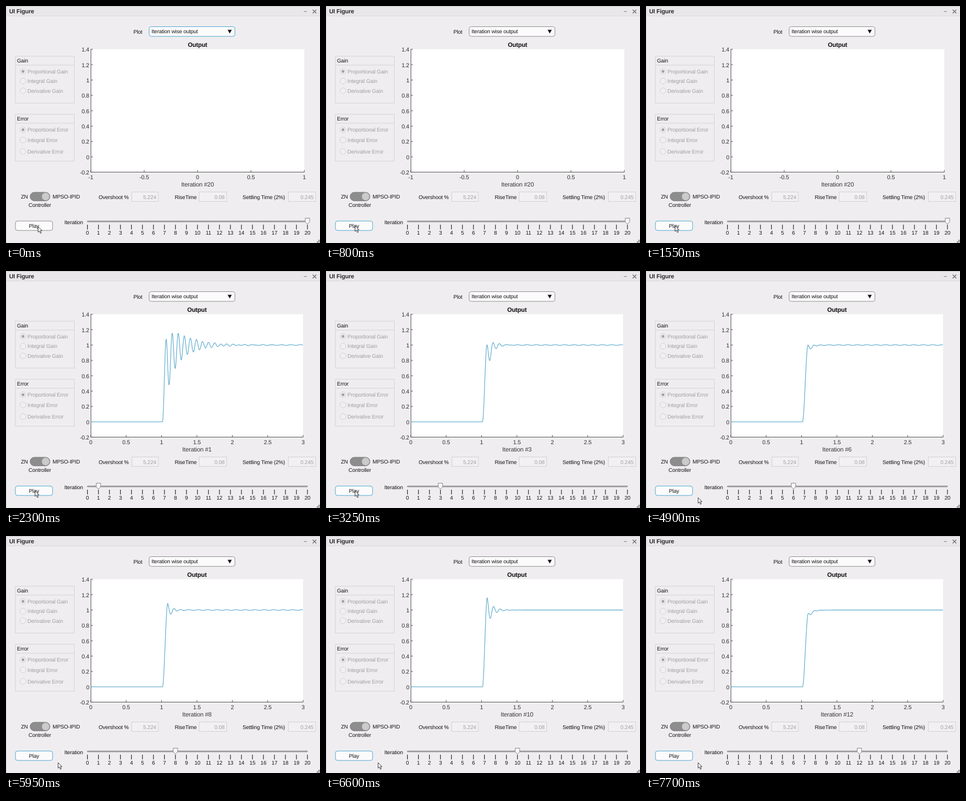
Recreate the animation shown at these times as an HTML page. Size 600 px wide and 453 px high, loop 8 s.

```html
<!DOCTYPE html>
<html lang="en">
<head>
<meta charset="utf-8">
<title>UI Figure</title>
<style>
html, body { margin: 0; width: 100%; height: 100%; overflow: hidden; background: #efedef; }
svg { display: block; width: 100vw; height: 100vh; font-family: "Liberation Sans", Arial, sans-serif; }
text { text-rendering: geometricPrecision; letter-spacing: -0.017em; }
#button, #drop { fill: #fcfbfc; stroke: #8b8b8b; }
.focus { stroke: #4aa5d2 !important; }
</style>
</head>
<body>
<svg id="stage" viewBox="0 0 600 453"></svg>
<script>
const LOOP = 8000;
const stage = document.getElementById('stage');

function add(tag, attrs, parent = stage) {
  const el = document.createElementNS('http://www.w3.org/2000/svg', tag);
  for (const key in attrs) el.setAttribute(key, attrs[key]);
  parent.appendChild(el);
  return el;
}
const rect = (x, y, width, height, fill, more = {}) =>
  add('rect', { x, y, width, height, fill, ...more });
const line = (d, stroke, parent, width = 1) =>
  add('path', { d, stroke, fill: 'none', 'stroke-width': width }, parent);

// Text is placed by the vertical centre of its capitals.
function text(str, x, cy, { size = 10.3, anchor = 'start', fill = '#161616', weight = 400, parent } = {}) {
  const el = add('text', { x, y: cy + size * 0.36, 'font-size': size, 'text-anchor': anchor, fill, 'font-weight': weight }, parent);
  el.textContent = str;
  return el;
}

// Window frame
rect(0, 0, 600, 453, '#efedef');
rect(0, 0, 600, 19, '#e9e7e9');
line('M0 .5H600', '#c4c4c4');
line('M0 19H600', '#d9d7d9');
line('M.5 0V453', '#d2d2d2');
text('UI Figure', 6, 9.5, { size: 11.4, weight: 700, fill: '#2b2b2b' });
line('M569 10.5H575', '#8c8c8c', stage, 1.2);
line('M586 7L593 14M593 7L586 14', '#777', stage, 1.7);
for (const [x, y] of [[597, 447], [594, 450], [597, 450]]) rect(x, y, 2, 2, '#555');

// Drop-down
text('Plot', 243.5, 49);
const drop = rect(273.5, 39.5, 164, 18.5, '#fcfbfc', { id: 'drop', rx: 4 });
text('Iteration wise output', 278, 48.7);
add('path', { d: 'M423.5 45.5H431.5L427.5 52.5Z', fill: '#111' });

// Radio groups
function radioGroup(title, top, height, rows, labels) {
  rect(18, top, 112.5, height, 'none', { stroke: '#d3d1d3' });
  line(`M18 ${top + 17}H130.5`, '#d3d1d3');
  text(title, 21, top + 8.6);
  labels.forEach((label, i) => {
    add('circle', { cx: 32.5, cy: rows[i], r: 5.5, fill: '#f1eff1', stroke: '#d0ced0' });
    if (!i) add('circle', { cx: 32.5, cy: rows[i], r: 2.7, fill: '#a5a5a5' });
    text(label, 41, rows[i], { fill: '#a2a2a2' });
  });
}
radioGroup('Gain', 96, 89.5, [125, 143.5, 162], ['Proportional Gain', 'Integral Gain', 'Derivative Gain']);
radioGroup('Error', 207, 89.5, [236.5, 256, 278], ['Proportional Error', 'Integral Error', 'Derivative Error']);

// Axes
const yOf = v => 288.3 - 146.8 * v;
function axes(right, ticks) {
  const g = add('g', {});
  add('rect', { x: 162, y: 82.5, width: right - 162, height: 235, fill: '#fff' }, g);
  let d = `M162.3 82.5V317.5H${right}`;
  for (let i = 0; i < 9; i++) {
    const v = (i - 1) / 5, y = yOf(v);
    d += `M162 ${y}h4`;
    text(String(v), 159, y + 0.6, { size: 10.9, anchor: 'end', fill: '#303030', parent: g });
  }
  ticks.forEach((label, i) => {
    const x = 162 + (right - 162) * i / (ticks.length - 1);
    d += `M${x} 317.5v-4`;
    text(label, x, 327.5, { size: 10.9, anchor: 'middle', fill: '#303030', parent: g });
  });
  line(d, '#4a4a4a', g);
  const mid = (162 + right) / 2;
  text('Output', mid, 74, { size: 11.7, anchor: 'middle', weight: 700, fill: '#111', parent: g });
  const caption = text('Iteration #20', mid, 341, { size: 11.7, anchor: 'middle', fill: '#3c3c3c', parent: g });
  return { g, caption };
}
const emptyAxes = axes(570, ['-1', '-0.5', '0', '0.5', '1']);
const plotAxes = axes(567.7, ['0', '0.5', '1', '1.5', '2', '2.5', '3']);
const curve = line('', '#67b0d0', plotAxes.g, 1.3);
curve.setAttribute('stroke-linejoin', 'round');

// Response: [first peak x, offset, offset decay, swing, swing decay, period]
const responses = [
  [306, -.31, 12, .385, 34, 11.6],
  [306, -.15, 12, .41, 20, 11.8],
  [307.5, -.21, 6, .21, 10, 12],
  [308, -.13, 7, .13, 9, 12],
  [309, -.08, 8, .08, 8, 12],
  [309.5, -.05, 8, .05, 8, 12],
  [309, -.01, 10, .09, 9, 12.5],
  [309, -.01, 10, .095, 9, 12.5],
  [309, -.01, 10, .095, 9, 12.5],
  [308, -.02, 10, .18, 10, 12.5],
  [309.5, -.09, 7, .06, 7, 12],
  [310, -.085, 7, .04, 7, 12]
];
function responsePath(iteration) {
  const [peak, offset, offsetDecay, swing, swingDecay, period] = responses[iteration - 1];
  const start = 299;
  const ripple = iteration < 10 ? .0045 : 0;
  let d = `M162 ${yOf(0)}H${start}`;
  for (let x = start; x <= 567.7; x += 0.4) {
    const p = x - peak;
    let v;
    if (p < 0) {
      const s = (x - start) / (peak - start);
      v = (1 + offset + swing) * s * s * (3 - 2 * s);
    } else {
      v = 1 + offset * Math.exp(-p / offsetDecay)
        + swing * Math.exp(-p / swingDecay) * Math.cos(2 * Math.PI * p / period)
        + ripple * Math.min(1, p / 40) * Math.sin(2 * Math.PI * p / 18);
    }
    d += `L${x.toFixed(1)} ${yOf(v).toFixed(2)}`;
  }
  return d;
}
const paths = responses.map((_, i) => responsePath(i + 1));

// Toggle and read-outs
rect(46, 356, 38, 16.5, '#8d8d8d', { rx: 8.2, stroke: '#808080' });
add('circle', { cx: 75.7, cy: 364.2, r: 7.6, fill: '#cbcbcb', stroke: '#929292' });
text('ZN', 28.5, 364);
text('MPSO-IPID', 89, 364);
text('Controller', 64.5, 380.5, { anchor: 'middle' });
function readout(label, x, boxX, width, value) {
  text(label, x, 365.5);
  rect(boxX, 355.5, width, 18, '#f2f0f2', { stroke: '#d2d0d2' });
  text(value, boxX + width - 4, 365, { anchor: 'end', fill: '#a2a2a2' });
}
readout('Overshoot %', 177, 240.5, 50.5, '5.224');
readout('RiseTime', 322.5, 369, 52.5, '0.08');
readout('Settling Time (2%)', 452, 539.5, 52, '0.245');

// Button and slider
const button = rect(18, 411, 71, 18, '#fcfbfc', { id: 'button', rx: 4 });
text('Play', 53.5, 420.3, { anchor: 'middle' });
text('Iteration', 111.5, 413.5);
const slotX = i => 155.6 + 21.02 * i;
rect(155, 410.2, 421.5, 3, '#9d9d9d', { rx: 1 });
for (let i = 0; i <= 20; i++) {
  line(`M${slotX(i)} 418V427`, '#222', stage, 1.2);
  text(i, slotX(i), 433.2, { anchor: 'middle' });
}
const thumb = add('path', { d: 'M-4.2 405.5H4.2V412.5L0 417L-4.2 412.5Z', fill: '#f7f7f7', stroke: '#858585' });

const cursor = add('path', {
  d: 'M0 0V10.5L2.5 8.2L4.4 12.6L6.2 11.8L4.3 7.6H7.7Z',
  fill: '#fff', stroke: '#222', 'stroke-width': 0.9
});

// Times at which each iteration reaches the plot and the slider
const plotTimes = [1650, 2520, 2950, 3370, 3950, 4500, 5020, 5520, 6000, 6550, 7000, 7700];
const thumbTimes = [1900, 2600, ...plotTimes.slice(2)];
const countPassed = (times, t) => times.filter(at => t >= at).length;

function glide(t, from, to) {
  const s = Math.min(1, Math.max(0, (t - from) / (to - from)));
  return s * s * (3 - 2 * s);
}

let shown = -1;
function draw(t) {
  const iteration = countPassed(plotTimes, t);
  if (iteration !== shown) {
    shown = iteration;
    emptyAxes.g.style.display = iteration ? 'none' : '';
    plotAxes.g.style.display = iteration ? '' : 'none';
    if (iteration) {
      curve.setAttribute('d', paths[iteration - 1]);
      plotAxes.caption.textContent = 'Iteration #' + iteration;
    }
  }
  thumb.setAttribute('transform', `translate(${slotX(countPassed(thumbTimes, t) || 20)} 0)`);

  const pressed = t >= 500;
  button.classList.toggle('focus', pressed);
  drop.classList.toggle('focus', !pressed);

  const settle = glide(t, 50, 400), leave = glide(t, 3900, 4400);
  cursor.setAttribute('transform',
    `translate(${61.3 - 5.8 * settle + 44 * leave} ${421.8 - 1.5 * settle + 13 * leave})`);
}

function tick() {
  draw(performance.now() % LOOP);
  requestAnimationFrame(tick);
}
draw(0);
requestAnimationFrame(tick);
</script>
</body>
</html>
```
